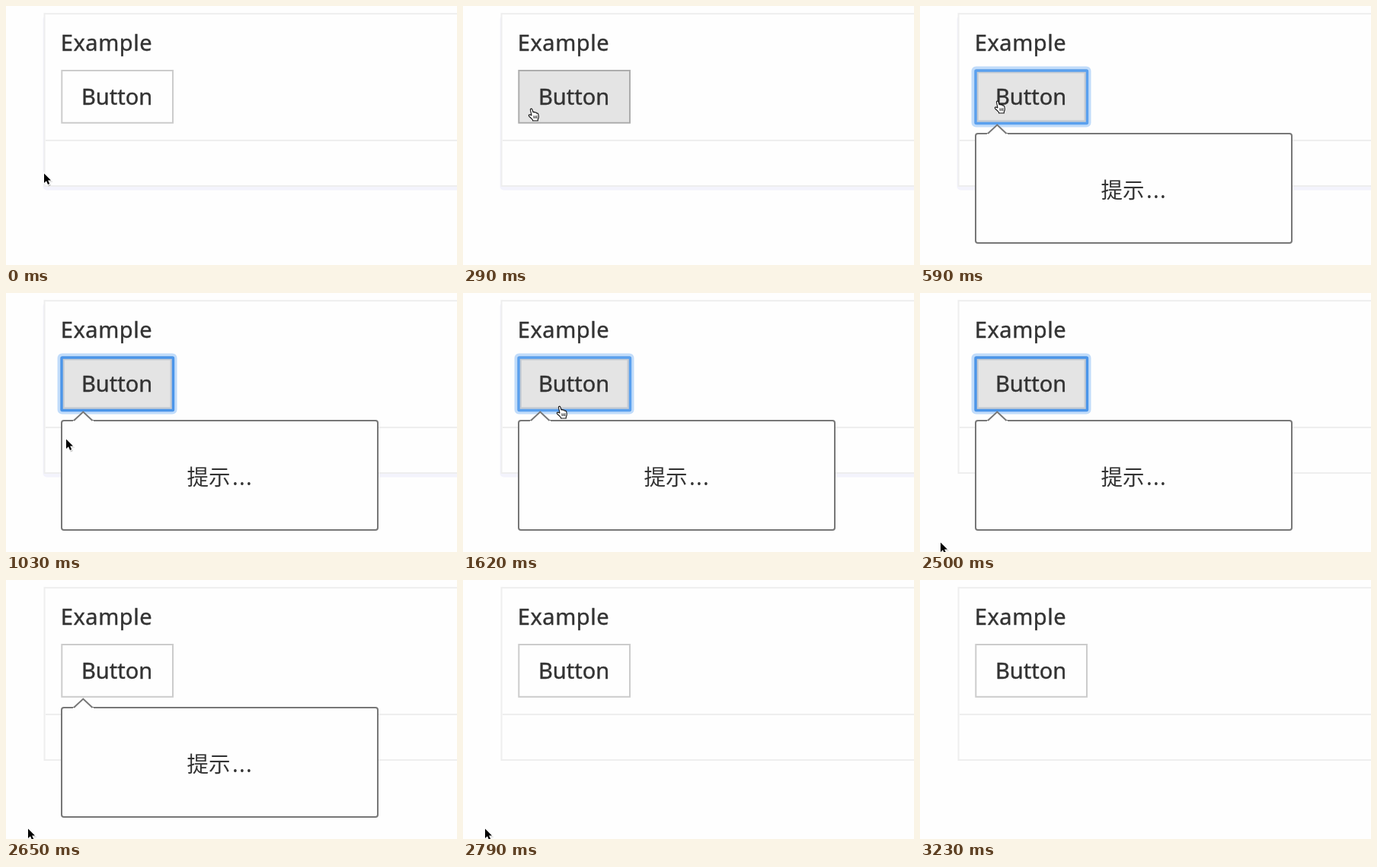
These frames come from a looping animation (592 by 341 pixels, 3.61 s). An HTML page:

```html
<!DOCTYPE html>
<html lang="en">
<head>
<meta charset="utf-8">
<title>Button popover</title>
<style>
  html, body { margin: 0; width: 100%; height: 100%; overflow: hidden; background: #fefefe; }
  svg { display: block; width: 592px; height: 341px; }
  text { font: 29px "Noto Sans", "Open Sans", sans-serif; fill: #333; }
  .label { stroke: #333; stroke-width: .4; }
  .cjk { font: 300 28.5px "Noto Sans CJK SC", "Noto Sans CJK", sans-serif; }
  .line { fill: none; stroke: #eee; stroke-width: 2; }
  #button { fill: #fefefe; stroke: #ccc; stroke-width: 2; }
  #button.hover { fill: #e4e4e4; stroke: #adadad; }
  #button.focus { fill: #e4e4e4; stroke: #c4cad2; stroke-width: 7; }
  #popover { fill: #fefefe; stroke: #777; stroke-width: 2; }
</style>
</head>
<body>
<svg viewBox="0 0 592 341">
  <rect id="shadow" x="48.500" y="13" width="600" height="229.5" rx="5" fill="#f3f3fc"/>
  <rect class="line" x="50.500" y="10.2" width="600" height="226.8" style="fill:#fefefe"/>
  <path class="line" d="M52 177H592"/>
  <text class="label" x="71.800" y="59" letter-spacing=".55">Example</text>

  <rect id="button" x="73.300" y="85" width="145.7" height="68.8"/>
  <g id="ring" fill="none">
    <rect x="69.5" y="81.5" width="153" height="76" rx="4" stroke="#c1dcfa" stroke-width="4"/>
    <rect id="ringLine" x="73" y="85" width="146.5" height="69.5" rx="1" stroke-width="3.4"/>
  </g>
  <text class="label" x="99" y="130">Button</text>

  <g id="popover">
    <rect x="73" y="168" width="415" height="144" rx="3"/>
    <path d="M88 170V168H90L101.300 156.500L113 168H115V170Z" stroke="none"/>
    <path d="M89 168L101.300 156.500L113.500 168" fill="none"/>
    <g stroke="none">
      <text class="cjk" x="237.500" y="252.500">提示</text>
      <text x="297" y="252.500" letter-spacing="1.2">...</text>
    </g>
  </g>

  <g id="arrow">
    <path d="M-1 1V15L3.300 12L5.800 17.500L9 16L6.800 11.500H11.500Z" fill="#0003"/>
    <path d="M0 .5V13L3 10.300L5 15L7.200 14L5.100 9.400H9Z"
          stroke="#fff" stroke-width="2" paint-order="stroke"/>
  </g>
  <g id="hand" fill="#fff" stroke="#111" stroke-width="1.1" stroke-linejoin="round">
    <path d="M5 10L3.500 3.200Q3.200 1.400 4.400 1.200Q5.500 1 6 2.600L7.100 6Q7.800 5 8.800 5.600L9.300 6.400
             Q10.400 5.500 11.300 6.400L11.700 7.300Q13.300 6.600 13.800 8.300L14.300 11.500Q14.300 13.500 13.300 15V17
             H6.500V16Q4.500 13.500 2 11.500Q.7 10 1.700 9.300Q3 8.800 5 10Z"/>
    <path d="M7.800 10.500L8.200 14M9.900 10.500L10.100 14M11.900 10.300V14" stroke-width=".9"/>
  </g>
</svg>
<script>
const LOOP = 3610, FOCUS = 590, LEAVE = 2200, BLUR = 2650, CLOSE = 2790;

// [start ms, x, y, pointer]; the pointer jumps between samples
const moves = [
  [0, 50, 220, 'arrow'], [150, 52, 210, 'arrow'],
  [290, 85, 134, 'hand'], [440, 97, 124, 'hand'],
  [880, 111, 165, 'arrow'], [1030, 79, 192, 'arrow'],
  [1180, 112, 165, 'arrow'], [1320, 140, 195, 'arrow'],
  [1470, 51, 166, 'arrow'], [1620, 122, 148, 'hand'],
  [1760, 110, 198, 'arrow'], [1910, 70, 133, 'hand'],
  [2060, 85, 266, 'arrow'], [2200, 0, 0, 'none'],
  [2500, 27, 328, 'arrow'], [2650, 29, 327, 'arrow'],
  [2940, 417, 331, 'arrow'], [3080, 488, 337, 'arrow'],
  [3230, 0, 0, 'none'],
];
const $ = id => document.getElementById(id);
const show = (id, on) => $(id).style.display = on ? '' : 'none';

function draw(t) {
  const [, x, y, pointer] = moves.findLast(m => m[0] <= t);
  const hover = pointer === 'hand';
  const focus = t >= FOCUS && t < BLUR;

  for (const id of ['arrow', 'hand']) {
    show(id, id === pointer);
    $(id).setAttribute('transform', `translate(${x} ${y})`);
  }
  $('button').setAttribute('class', focus ? 'focus' : hover ? 'hover' : '');
  $('ringLine').setAttribute('stroke', hover ? '#5aa0ee' : '#4b95e9');
  show('ring', focus);
  show('popover', t >= FOCUS && t < CLOSE);
  show('shadow', t < LEAVE);
}

const start = performance.now();
function tick() {
  draw((performance.now() - start) % LOOP);
  requestAnimationFrame(tick);
}
tick();
</script>
</body>
</html>
```
